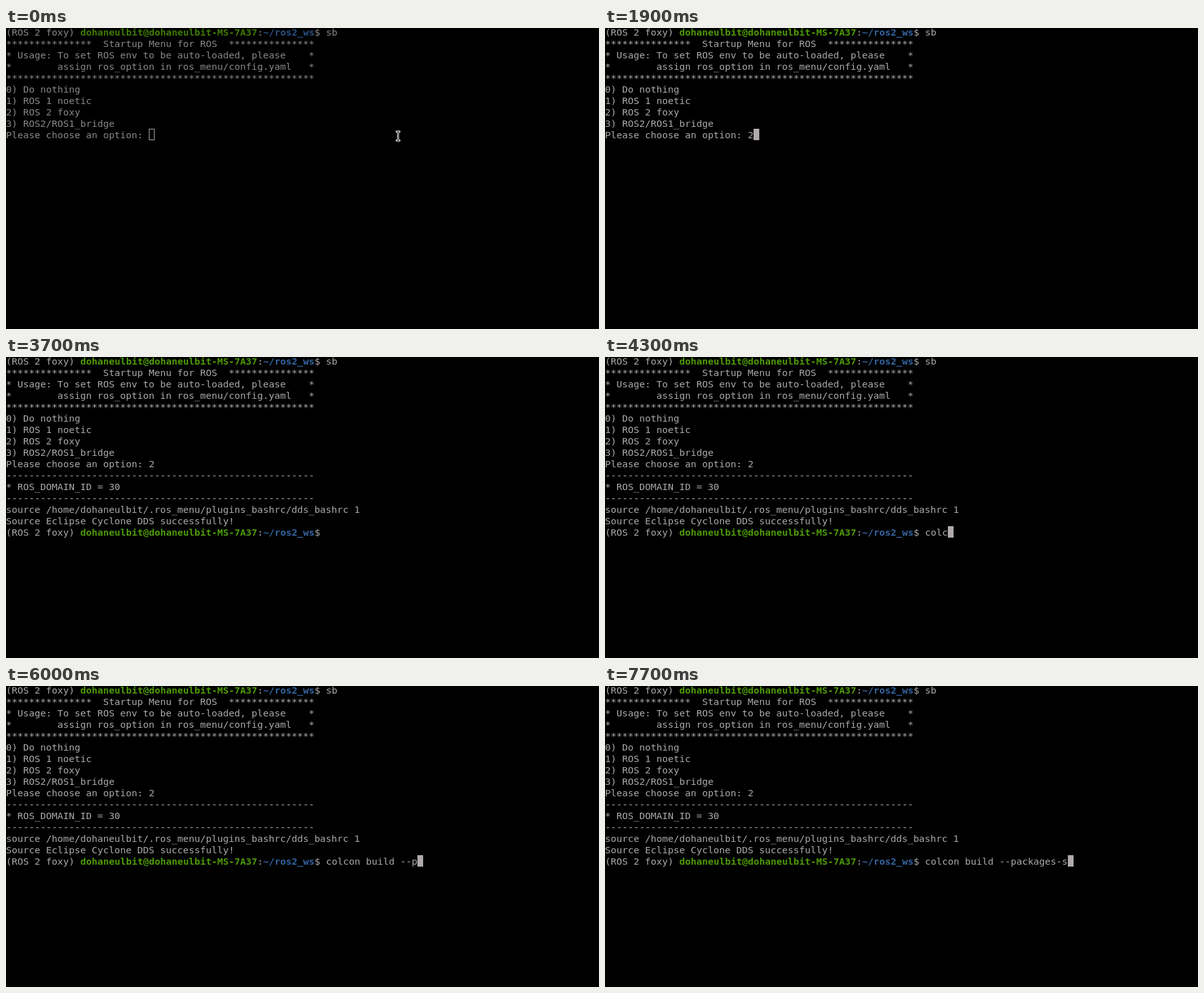
These frames come from a looping animation (934 by 475 pixels, 8000 ms). An HTML page:

```html
<!DOCTYPE html>
<html lang="en">
<head>
<meta charset="utf-8">
<title>Terminal session</title>
<style>
  html, body { margin: 0; width: 100%; height: 100%; overflow: hidden; background: #000; }
  svg { display: block; width: 934px; height: 475px; }
  text {
    font: 14.95px "DejaVu Sans Mono", monospace;
    white-space: pre;
    fill: #aaa;
  }
  .user { fill: #4e9a06; font-weight: bold; }
  .path { fill: #3465a4; font-weight: bold; }
</style>
</head>
<body>
<svg viewBox="0 0 934 475">
  <g id="screen"></g>
  <rect id="caret" stroke="#b0aaaa"/>
  <g id="pointer" fill="none">
    <path d="M-2 -7H2M0 -7V7M-2 7H2" stroke="#fff" stroke-width="3" stroke-linecap="square"/>
    <path d="M-2 -7H2M0 -7V7M-2 7H2" stroke="#000" stroke-linecap="square"/>
  </g>
</svg>
<script>
const LOOP = 8000, STEP = 100, CELL_W = 9, CELL_H = 18, ROW_TOP = -3, BASELINE = 12;
const [screenEl, caret, pointer] = ["screen", "caret", "pointer"].map(id => document.getElementById(id));

const user = "dohaneulbit";
const prompt = [["(ROS 2 foxy) "], [`${user}@${user}-MS-7A37`, "user"], [":"], ["~/ros2_ws", "path"], ["$ "]];
const rule = char => [[char.repeat(54)]];
const command = "colcon build --packages-s";
const PROMPT_COLS = 56, LAST_ROW = 15, CHOICE_ROW = 9;

const lines = [
  [...prompt, ["sb"]],
  [["*".repeat(15) + "  Startup Menu for ROS  " + "*".repeat(15)]],
  [["* Usage: To set ROS env to be auto-loaded, please    *"]],
  [["*        assign ros_option in ros_menu/config.yaml   *"]],
  rule("*"),
  [["0) Do nothing"]],
  [["1) ROS 1 noetic"]],
  [["2) ROS 2 foxy"]],
  [["3) ROS2/ROS1_bridge"]],
  [["Please choose an option: "], ["2"]],
  rule("-"),
  [["* ROS_DOMAIN_ID = 30"]],
  rule("-"),
  [[`source /home/${user}/.ros_menu/plugins_bashrc/dds_bashrc 1`]],
  [["Source Eclipse Cyclone DDS successfully!"]],
  [...prompt, [""]]
];

function addRun(parent, row, col, [content, style]) {
  const run = document.createElementNS("http://www.w3.org/2000/svg", "text");
  run.setAttribute("x", col * CELL_W);
  run.setAttribute("y", row * CELL_H + BASELINE);
  if (style) run.setAttribute("class", style);
  run.textContent = content;
  parent.append(run);
  return run;
}

const rows = lines.map((runs, row) => {
  const group = document.createElementNS("http://www.w3.org/2000/svg", "g");
  screenEl.append(group);
  let col = 0;
  const texts = runs.map(run => {
    const el = addRun(group, row, col, run);
    col += run[0].length;
    return el;
  });
  return { group, last: texts[texts.length - 1] };
});

// Each table holds [start time, value] pairs.
const shownRows = [[0, 10], [2200, 14], [2400, 16]];
const typed = [[0, 0], [3900, 1], [4200, 2], [4300, 4], [4500, 5], [4700, 7], [5000, 8],
  [5100, 11], [5200, 13], [5600, 14], [6000, 16], [6200, 17], [6700, 18], [6900, 20],
  [7100, 22], [7200, 23], [7700, 25]];
const caretOn = [[0, 1], [900, 0], [1500, 1], [2900, 0], [3100, 1], [3700, 0], [3900, 1]];
const brightness = [[0, 0.8], [300, 0.9], [400, 1]];
const at = (table, t) => table.findLast(([start]) => start <= t)[1];

function caretCell(t, count) {
  if (t < 1900) return [25, CHOICE_ROW];
  if (t < 2100) return [26, CHOICE_ROW];
  if (t < 2200) return [0, 10];
  if (t < 2400) return [0, 14];
  return [PROMPT_COLS + count, LAST_ROW];
}

function draw(time) {
  const t = Math.floor(time / STEP) * STEP;
  const count = at(typed, t), visible = at(shownRows, t);

  rows.forEach(({ group }, i) => group.style.display = i < visible ? "" : "none");
  rows[CHOICE_ROW].last.textContent = t < 1900 ? "" : "2";
  rows[LAST_ROW].last.textContent = command.slice(0, count);
  screenEl.style.opacity = at(brightness, t);

  const [col, row] = caretCell(t, count);
  const focused = t >= 300;
  const box = {
    x: col * CELL_W + 0.5, y: row * CELL_H + ROW_TOP + 0.5,
    width: CELL_W - 1, height: CELL_H - 1, fill: focused ? "#b0aaaa" : "none"
  };
  for (const key in box) caret.setAttribute(key, box[key]);
  caret.style.display = at(caretOn, t) ? "" : "none";

  const p = Math.min(1, Math.max(0, (t - 100) / 500));
  const ease = p * p * (3 - 2 * p);
  const x = Math.round(617 - 57 * ease) + 0.5, y = Math.round(170 + 20 * ease) + 0.5;
  pointer.setAttribute("transform", `translate(${x} ${y})`);
  pointer.style.display = t < 1700 ? "" : "none";
}

const start = performance.now();
function tick() {
  draw((performance.now() - start) % LOOP);
  requestAnimationFrame(tick);
}
tick();
</script>
</body>
</html>
```
